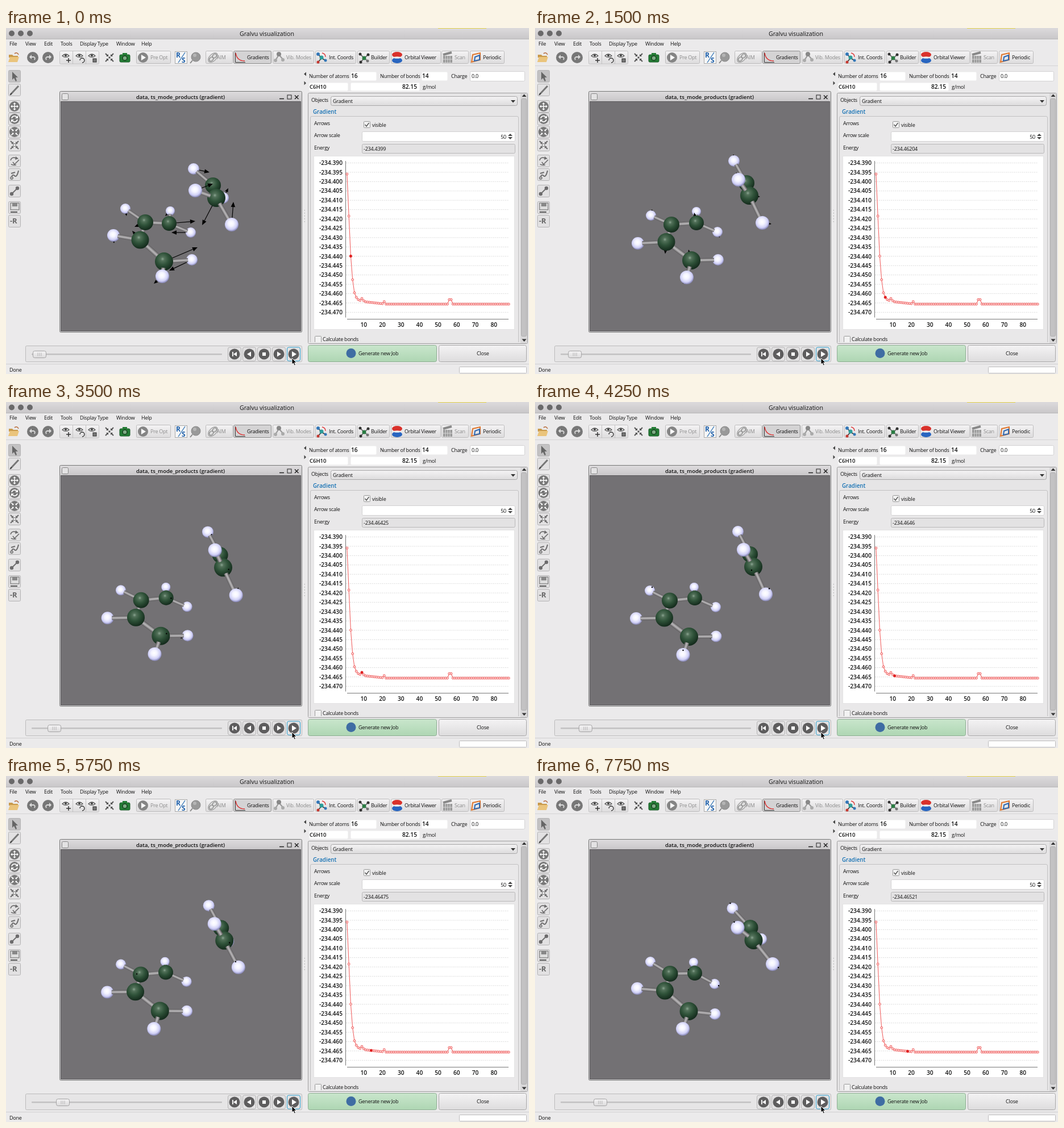
Write an HTML page that moves like this. It is 920x609 px and loops after 8 s.

```html
<!DOCTYPE html>
<html lang="en">
<head>
<meta charset="utf-8">
<title>Gralvu visualization</title>
<style>
html, body { margin: 0; width: 100%; height: 100%; overflow: hidden; background: #ebeaeb; }
svg { display: block; }
text { font: 9px "Open Sans", "Noto Sans", sans-serif; letter-spacing: -.25px; fill: #111; white-space: pre; }
.b { font-weight: 600; font-size: 10.2px; letter-spacing: 0; }
.off { fill: #8b8b8b; }
</style>
</head>
<body>
<svg id="stage" width="920" height="609" viewBox="0 0 920 609">
<defs>
  <linearGradient id="bar" x2="0" y2="1"><stop stop-color="#dcdadc"/><stop offset="1" stop-color="#c9c7c9"/></linearGradient>
  <linearGradient id="btn" x2="0" y2="1"><stop stop-color="#f4f3f4"/><stop offset="1" stop-color="#dddcdd"/></linearGradient>
  <linearGradient id="go" x2="0" y2="1"><stop stop-color="#c9e6cc"/><stop offset="1" stop-color="#aed6b3"/></linearGradient>
  <radialGradient id="H" cx=".46" cy=".42" r=".58"><stop stop-color="#fff"/><stop offset=".35" stop-color="#f4f4ff"/><stop offset=".75" stop-color="#cfcff6"/><stop offset="1" stop-color="#8484b4"/></radialGradient>
  <radialGradient id="C" cx=".42" cy=".36" r=".66"><stop stop-color="#8aa591"/><stop offset=".16" stop-color="#527059"/><stop offset=".5" stop-color="#2f5239"/><stop offset="1" stop-color="#12281a"/></radialGradient>
</defs>
<g id="ui"></g><g id="live"></g><g id="top"></g>
</svg>
<script>
const byId = id => document.getElementById(id);
const rect = (x, y, w, h, fill, stroke = 'none', r = 0) =>
  `<rect x="${x}" y="${y}" width="${w}" height="${h}" rx="${r}" fill="${fill}" stroke="${stroke}"/>`;
const disc = (x, y, r, fill, stroke = 'none', w = 1) =>
  `<circle cx="${x}" cy="${y}" r="${r}" fill="${fill}" stroke="${stroke}" stroke-width="${w}"/>`;
const path = (d, stroke, w = 1, fill = 'none', more = '') =>
  `<path d="${d}" stroke="${stroke}" stroke-width="${w}" fill="${fill}" ${more}/>`;
const solid = (d, fill) => path(d, 'none', 0, fill);
const text = (x, y, s, more = '') => `<text x="${x}" y="${y}" ${more}>${s}</text>`;
const at = (x, y, s) => `<g transform="translate(${x} ${y})">${s}</g>`;

// ---------- icons, centred on 0,0 ----------
const GREY = '#6d6c6d';
const eye = path('M-6 -2Q0 -8 6 -2Q0 3 -6 -2Z', '#555', 1.2, '#eee') + disc(0, -2.5, 2, '#444');
const inward = c => path('M-7 -7L-3 -3M7 -7L3 -3M-7 7L-3 3M7 7L3 3', c, 2) +
  solid('M-2 -2h-4l4 -4zM2 -2h4l-4 -4zM-2 2h-4l4 4zM2 2h4l-4 4z', c);
const cross = path('M0 -5V5M-5 0H5', '#fff', 1.4) +
  solid('M0 -7l2.5 3h-5zM0 7l2.5 -3h-5zM-7 0l3 -2.5v5zM7 0l-3 -2.5v5z', '#fff');
const turn = path('M-5 -1A5 5 0 0 1 4 -3M5 1A5 5 0 0 1 -4 3', '#fff', 1.6) +
  solid('M6 -6v5h-5zM-6 6v-5h5z', '#fff');
const back = path('M-4 -1H2Q5 0 3 4', '#ddd', 1.8) + solid('M-6 -1l4 -4v8z', '#ddd');
const play = solid('M-3 -5L5 0L-3 5Z', '#fff');

function toolbar() {
  let s = at(14, 52, solid('M-9 -5h6l2 2h8v3h-16z', '#c99a4b') + solid('M-10 8l3 -9h16l-3 9z', '#eac47c') +
    path('M1 -7Q6 -10 8 -5', '#b86c3c', 1.5));
  s += at(47, 52, disc(0, 0, 10, '#777') + back);
  s += at(74, 52, disc(0, 0, 10, '#777') + `<g transform="scale(-1 1)">${back}</g>`);
  s += rect(94.5, 40.5, 69, 23, 'url(#btn)', '#c4c3c4', 2) + path('M117.500 41V63M140.500 41V63', '#c4c3c4');
  [105, 129, 151].forEach((x, k) => s += at(x, 51, eye + at(5, 6,
    [path('M0 -4V4M-4 0H4', '#333', 1.5), path('M-4 0A4 4 0 1 1 0 4', '#333', 1.4), rect(-3, -3, 6, 6, '#777', '#333')][k])));
  s += at(182, 52, inward('#555') + rect(-1.5, -1.5, 3, 3, '#555'));
  s += at(209, 53, rect(-9, -6, 18, 13, '#247c35', '#1b5a28', 2) + rect(-4, -9, 8, 4, '#247c35') + disc(0, 0, 4, '#7dab84', '#153e1d', 1.5));
  const tab = (x, w, label, tx, off, on) => rect(x + .5, 40.5, w, 22, on ? '#d4d3d4' : 'url(#btn)', on ? '#8e8e8e' : '#bdbcbd', 2) +
    text(tx, 55, label, off ? 'class="off"' : '');
  s += tab(229, 60, 'Pre Opt', 254, 1) + at(241, 52, disc(0, 0, 9, '#858585') + play);
  s += rect(297.5, 41.5, 21, 21, '#f6f6f6', '#aaa') + text(299, 52, 'R', 'style="fill:#1d5faa;font-weight:700;font-size:12px"') +
    text(309, 61, 'S', 'style="fill:#1d5faa;font-weight:700;font-size:12px"') + path('M303 61L315 43', '#2c70b5', 1.3);
  s += disc(334, 51, 8, '#999', '#888') + disc(332, 48, 3, '#b5b5b5') + path('M328 57L324 62', '#888', 2);
  s += tab(351, 47, 'AIM', 371, 1) + at(364, 52, `<g transform="rotate(-45)"><ellipse rx="10" ry="6" fill="#ddd" stroke="#888"/><ellipse cx="-4" rx="4" ry="3" fill="none" stroke="#777"/><ellipse cx="4" rx="4" ry="3" fill="none" stroke="#777"/></g>`);
  s += tab(400, 66, 'Gradients', 424, 0, 1) + path('M403.500 43V60.500H421', '#333') + path('M404 44Q406 58 420 58', '#d22', 1.4);
  s += tab(469, 72, 'Vib. Modes', 493, 1) + path('M474 57L480 47L487 55', '#999', 2) + disc(474, 57, 3, '#aaa') + disc(480, 46, 4, '#888') + disc(487, 56, 3, '#aaa');
  s += tab(544, 71, 'Int. Coords', 568) + path('M549 46L555 53L549 60M555 53L562 57', '#333', 1.5) +
    disc(549, 46, 3, '#3478b8') + disc(555, 52, 3.5, '#2b9d9a') + disc(549, 60, 2.5, '#c63a32') + disc(562, 57, 2.5, '#3478b8') + path('M556 44Q562 45 562 51', '#d33', 1.3);
  s += tab(618, 56, 'Builder', 642) + path('M623 46L630 53L637 47M630 53L624 60M630 53L636 58', '#444', 1.3) +
    disc(623, 46, 2.5, '#333') + disc(630, 53, 3.5, '#297b42') + disc(637, 47, 2.5, '#333') + disc(624, 60, 2.5, '#333') + disc(636, 58, 2.5, '#777');
  s += tab(677, 87, 'Orbital Viewer', 701) + `<ellipse cx="688" cy="47" rx="9" ry="5" fill="#d9312b"/><ellipse cx="688" cy="57" rx="9" ry="5" fill="#2865c0"/><ellipse cx="688" cy="52" rx="7" ry="1.800" fill="#eee"/>`;
  s += tab(766, 47, 'Scan', 789, 1) + rect(769, 49, 16, 12, '#999') + path('M769 47L784 43', '#888', 4) + path('M773 49v12M777 49v12M781 49v12M769 55h16', '#d8d8d8');
  s += tab(816, 60, 'Periodic', 839) + path('M821 47L834 44V56L819 60Z', '#e0762c', 2) + path('M825 51L833 48V56L824 58Z', '#2e69b3', 2);
  return s;
}

function sideTools() {
  const box = (y, s, on) => rect(4.500, y - 10.5, 21, 21, on ? '#c3c2c3' : '#e2e1e2', '#b3b2b3', 2) + at(15, y, s);
  const knob = s => disc(0, 0, 9, '#777') + s;
  return box(85, solid('M-4 -8V6L-1 3L2 9L4 8L2 2H6Z', '#666'), 1) +
    box(109, path('M-7 8L7 -7', '#777', 3) + path('M-8 9L-5 6', '#333', 1.5)) +
    box(138, knob(cross)) + box(160, knob(turn)) + box(183, knob(`<g transform="scale(.8)">${inward('#fff')}</g>`)) +
    box(206, inward(GREY) + disc(0, 0, 2.5, '#eee', GREY)) +
    box(234, path('M-7 -1Q-5 -8 3 -5M-3 2L0 6L8 -2M-6 6Q-2 8 3 7', GREY, 1.6) + solid('M2 -8l5 4l-6 2z', GREY)) +
    box(258, path('M-6 7Q-4 -2 0 2T7 -7M-6 -2L1 -4', GREY, 2) + disc(-5, 6, 2.5, '#aaa', GREY)) +
    box(287, path('M-5 5L5 -5', GREY, 1.8) + disc(-5, 5, 3.2, GREY) + disc(5, -5, 3.2, GREY)) +
    box(316, rect(-7, -8, 15, 12, '#ddd', '#666') + rect(-4, -8, 9, 6, '#888') + path('M-7 8H5', '#555', 2)) +
    box(340, text(-8, 4, '-R', 'style="font-size:13px;font-weight:700;fill:#666"'));
}

// ---------- chart ----------
const head = [257, 331, 401.5, 443, 466, 474, 478, 479.5, 476, 480];
const px = i => 596.6 + 3.27 * i;
const py = i => i <= 10 ? head[i - 1] : i < 21 ? 482 + (i - 11) * .36 : i == 21 ? 481.500 : i == 56 || i == 57 ? 478 : 486;

function chart() {
  let s = rect(541.5, 225.5, 353, 305, '#fff', '#e3e3e3');
  for (let k = 0; k <= 16; k++) {
    const y = 237.5 + k * 16.43;
    s += path(`M598 ${y}H884`, '#dcdcdc', 1, 'none', 'stroke-dasharray="2 1.500"');
    s += text(592, y + 3.700, '-234.' + (390 + 5 * k), 'class="b" text-anchor="end"');
  }
  s += path('M597.500 234V509.500M600 512.500H884', '#777');
  for (let k = 10; k <= 80; k += 10) s += text(px(k), 526, k, 'class="b" text-anchor="middle"');
  let d = '', dots = '';
  for (let i = 1; i <= 88; i++) {
    d += (i > 1 ? 'L' : 'M') + px(i) + ' ' + py(i);
    dots += disc(px(i), py(i), 1.900, '#fde3e3', '#ee4a4a', .9);
  }
  return s + path(d, '#f06464', 1.1) + dots;
}

function panel() {
  const f = (x, y, w, h, fill = '#fff', edge = '#d2d1d2') => rect(x + .5, y + .5, w, h, fill, edge, 2);
  const check = (x, y) => rect(x + .5, y + .5, 11, 11, '#f2f2f2', '#999', 1);
  let s = solid('M524 81l4 -3.500v7z', '#444') + solid('M528 97l-3.500 -3.500v7z', '#444');
  s += text(533, 88, 'Number of atoms') + f(606, 77, 45, 15, '#fff', '#f4f4f4') + text(607, 88, '16', 'class="b"');
  s += text(658, 88, 'Number of bonds') + f(731, 77, 45, 15, '#fff', '#f4f4f4') + text(732, 88, '14', 'class="b"');
  s += text(783, 88, 'Charge') + f(816, 76, 96, 17) + text(819, 88, '0.0');
  s += f(533, 96, 68, 14, '#fff', '#f4f4f4') + text(534, 107, 'C6H10', 'class="b" style="font-size:9.500px"');
  s += f(606, 96, 121, 14, '#fff', '#f4f4f4') + text(723, 107, '82.15', 'class="b" text-anchor="end"') + text(733, 107, 'g/mol');
  s += rect(531.5, 114.5, 386, 441, '#e6e5e6', '#9d9c9d', 2);
  s += text(537, 130, 'Objects') + rect(571.5, 120.5, 328, 16, 'url(#btn)', '#a9a8a9', 3) + text(575, 132, 'Gradient') + solid('M888 127h8l-4 4.500z', '#333');
  s += text(540, 151, 'Gradient', 'class="b" style="fill:#1672b4;font-size:9.800px"');
  s += path('M535.500 553V158Q535.500 155.500 538 155.500H899Q901.500 155.500 901.500 158V553', '#c2c1c2', 1, '#e9e8e9');
  s += text(542, 171, 'Arrows') + check(629, 164) + path('M631.500 170L634 173L638.500 167', '#555', 1.4) + text(644, 174, 'visible');
  s += text(542, 192, 'Arrow scale') + f(626, 182, 269, 17) + text(880, 195, '50', 'text-anchor="end"') + solid('M883 190l4 -4l4 4zM883 192l4 4l4 -4z', '#444');
  s += text(542, 214, 'Energy') + f(626, 204, 269, 16, '#e3e2e3', '#b9b8b9');
  s += chart() + rect(543.5, 542.5, 11, 11, '#f2f2f2', '#999', 1) + text(557, 551, 'Calculate bonds');
  s += rect(532, 553, 372, 2, '#e6e5e6') + rect(905, 115, 12, 440, '#d9d8d9') + rect(906.5, 124.500, 9, 418, '#c3c2c3', '#adacad', 2);
  s += solid('M907.500 121h8l-4 -4.500zM907.500 547.500h8l-4 4.500z', '#333');
  for (let y = 320; y < 345; y += 5) s += rect(524.5, y, 1.500, 1.500, '#bbb');
  s += rect(531.5, 558.5, 226, 29, 'url(#go)', '#8fae94', 3) + disc(607, 572.5, 8.500, '#3f6da3') + text(620, 576, 'Generate new Job');
  return s + rect(761.5, 558.5, 154, 29, 'url(#btn)', '#a9a8a9', 3) + text(828, 576, 'Close');
}

function frame() {
  let s = rect(0, 0, 920, 609, '#ebeaeb') + rect(0, 0, 920, 19, 'url(#bar)') + path('M0 19.500H920', '#b9b8b9') + rect(760, 0, 85, 1, '#e8d648');
  [10, 26, 42].forEach(x => s += disc(x, 9.5, 5, '#6a696a'));
  s += text(459, 13.5, 'Gralvu visualization', 'text-anchor="middle" style="font-size:10.600px;letter-spacing:0"');
  const menu = { File: 6, View: 34, Edit: 67, Tools: 96, 'Display Type': 130, Window: 194, Help: 238 };
  for (const m in menu) s += text(menu[m], 30.5, m);
  s += toolbar() + path('M0 66.500H920', '#d5d4d5') + sideTools();
  s += rect(94.5, 111.5, 426, 424, '#dad9da', '#777', 2) + rect(96, 113, 423, 16, 'url(#bar)') + rect(96.5, 129.5, 422, 404, '#737174', '#59575a');
  s += rect(98.5, 115.5, 11, 11, '#e3e2e3', '#888', 2) + text(307, 125, 'data, ts_mode_products (gradient)', 'class="b" text-anchor="middle" style="font-size:9.500px"');
  s += path('M481 124.500H489M508 118.500L514.500 125M514.500 118.500L508 125', '#222', 1.5) + rect(495, 118, 7, 7, 'none', '#222');
  s += rect(34.5, 559.5, 486, 28, '#e6e5e6', '#bbbabb', 2) + rect(45, 573, 335, 2.500, '#c2c1c2', 'none', 1);
  const marks = ['M4 -4V4L-2 0ZM-4 -4h1.800v8h-1.800z', 'M3 -4.500V4.500L-4 0Z', 'M-3 -3H3V3H-3Z', 'M-3 -4.500V4.500L4 0Z', 'M-3 -5V5L5 0Z'];
  marks.forEach((d, k) => s += at(402 + 26 * k, 574, rect(-11.5, -12, 23, 24, '#e3e2e3', k > 3 ? '#2b9fce' : '#b5b4b5', 3) +
    disc(0, 0, 9.5, '#5e5d5e') + solid(d, '#fff')));
  s += panel() + path('M0 591.500H920', '#cfcecf') + text(6, 605, 'Done');
  return s + rect(797.5, 596.5, 118, 11, '#fff', '#bdbcbd', 1);
}

// ---------- molecule ----------
// each atom: radius, late bend, then x,y at the key steps
const keys = [3, 6, 8, 11, 18];
const diene = {
  Ha: [9, 2.7, 210, 318, 204, 330, 202, 331, 202, 332, 203, 327],
  Hb: [8, 1.2, 289, 322, 284, 323, 282, 326, 280, 326, 279, 328],
  Hc: [9, 2, 325, 360, 321, 359, 319, 360, 318, 361, 316, 366],
  Hd: [11, 3, 189, 365, 181, 379, 179, 380, 178, 381, 180, 374],
  He: [10, 1.9, 327, 408, 322, 408, 320, 410.5, 318.5, 412.5, 316.5, 419],
  Hf: [12, 1, 275, 437, 267, 439, 262, 443, 260.5, 445, 260, 445],
  C1: [14, 3, 245, 342, 240, 346, 238, 348.5, 237, 349.5, 237.5, 348],
  C2: [13, 1.5, 287, 344, 284, 343, 282, 344.5, 281, 345, 281, 347],
  C3: [15.5, 3, 236, 373, 231, 376.5, 229, 379, 227.5, 380, 228.5, 378],
  C4: [16, 1, 278, 411, 275, 409, 273, 411, 271, 413, 270.5, 414]
};
const ethene = {
  Ca: [14, 1, 364, 277, 372, 273, 376, 270, 378, 268, 378.5, 267],
  Cb: [16, 1, 370, 299, 377, 295, 381, 292, 384, 290, 384.5, 289],
  H1: [10, 4, 330, 248, 350, 234, 354, 229, 357, 228, 347.5, 233],
  H2: [12, 4, 333, 286, 358, 267, 368, 261, 367, 260, 356.5, 267],
  H3: [12, 1.7, 397, 346, 400, 343, 404, 341, 406, 338.5, 418, 331],
  H4: [10, 1.7, 382, 299, 380, 296, 384, 295, 389, 293, 398, 287]
};
const atoms = { ...diene, ...ethene };
const order = 'Hb Hb-C2 C1-C2 Ha Ha-C1 Hc C2-Hc C2 C1-C3 C1 Hd Hd-C3 C3-C4 C3 He C4-He C4 C4-Hf Hf ' +
  'H1 H1-Ca H4 H4-Ca Ca Ca-Cb Cb Cb-H3 H3 Cb-H2 H2';
const forces = {
  3: { H1: [28, 6], H2: [31, -12], H4: [9, -17], Cb: [-25, 48], H3: [3, -40], C2: [46, -4], Hc: [-34, 0], C4: [59, -25],
    He: [-40, 19], Hf: [-15, 13], Hb: [-9, 9], Ha: [2, 13], Hd: [1, 14], C1: [-19, 8], C3: [-14, -16] },
  6: { H1: [-1, -12], H2: [-4, -13], Cb: [19, 2], H3: [16, 2], Ha: [2, -11], C2: [-4, -18], Hc: [4, 10], Hd: [0, -11],
    C3: [-2, 21], C4: [-5, -19], Hf: [-7, 11] },
  8: { Cb: [16, 2], H3: [3, -16], H1: [10, 7], Ca: [-15, 2], C2: [13, 1], He: [-14, 5], C4: [15, -6], Hb: [0, 10] },
  11: { H3: [6, -10], Cb: [-3, 6], Ha: [4, -6], He: [-11, 4], Hf: [0, -8] },
  14: { Cb: [9, 4], C1: [-7, -1], C4: [16, -5], H3: [-5, -10] },
  16: { H3: [10, -7], Ca: [-14, 8] },
  18: { H1: [-4, -9], H2: [-6, -10], H3: [10, 6], Hc: [7, 3], C2: [-11, -6] }
};
const forceKeys = Object.keys(forces).map(Number);
const mix = (a, b, u) => a + (b - a) * u;

function segment(list, i) {
  let k = 0;
  while (k < list.length - 2 && i >= list[k + 1]) k++;
  return [k, (i - list[k]) / (list[k + 1] - list[k])];
}

function place(name, i) {
  const [r, bend, ...p] = atoms[name];
  let [k, u] = segment(keys, i);
  if (k == 0) u = 1 - (1 - u) ** 1.6;
  if (k == 3) u = u ** bend;
  return { r, x: mix(p[2 * k], p[2 * k + 2], u), y: mix(p[2 * k + 1], p[2 * k + 3], u) };
}

function force(name, i) {
  const [k, u] = segment(forceKeys, i);
  const a = forces[forceKeys[k]][name] || [0, 0], b = forces[forceKeys[k + 1]][name] || [0, 0];
  return [mix(a[0], b[0], u), mix(a[1], b[1], u)];
}

function bond(a, b) {
  const dx = b.x - a.x, dy = b.y - a.y, len = Math.hypot(dx, dy), w = (a.r + b.r) / 4;
  const s = a.r * .7 / len, e = 1 - b.r * .7 / len;
  if (s >= e) return '';
  const d = `M${a.x + dx * s} ${a.y + dy * s}L${a.x + dx * e} ${a.y + dy * e}`;
  return path(d, '#656365', w + .6) + path(d, '#8f8d8f', w * .75) + path(d, '#b2b0b2', w * .35);
}

function atom(name, i) {
  const a = place(name, i), [dx, dy] = force(name, i), len = Math.hypot(dx, dy);
  const ball = disc(a.x, a.y, a.r, `url(#${name[0]})`);
  if (len < 3) return ball;
  if (len < a.r) return ball + disc(a.x + dx, a.y + dy, 1.2, '#000');
  const h = 2 + Math.min(7, len * .25), w = h * .42;
  const arrow = path(`M0 0H${len - h}`, '#000', 1.2) + solid(`M${len} 0l${-h} ${w}v${-2 * w}z`, '#000');
  const deg = Math.atan2(dy, dx) * 180 / Math.PI;
  return `<g transform="translate(${a.x} ${a.y}) rotate(${deg})">${arrow}</g>` + ball;
}

const molecule = i => order.split(' ').map(s => {
  const [a, b] = s.split('-');
  return b ? bond(place(a, i), place(b, i)) : atom(a, i);
}).join('');

// ---------- playback ----------
const energy = ['4399', '45246', '45971', '46204', '46331', '46388', '46298', '46425', '4646', '46466', '46471', '46475', '46485', '46494', '46507', '46521'];
const LOOP = 8000, TICK = 250, STEP = 520;
let shown = -1;

function draw(ms) {
  const t = Math.floor(ms % LOOP / TICK) * TICK;
  if (t === shown) return;
  shown = t;
  const pose = 3 + Math.floor((t + 60) / STEP);
  const n = Math.floor((t + 310) / STEP); // readouts run ahead of the 3D view
  const x = 59 + 3.73 * n;
  byId('live').innerHTML = molecule(pose) + disc(px(pose), py(pose), 2.2, '#e02020', '#e02020', .6) +
    text(629, 216, '-234.' + energy[n]) +
    at(x, 574.5, rect(-11.5, -6, 23, 12, 'url(#btn)', '#a3a2a3', 3) + path('M-3 -3V3M0 -3V3M3 -3V3', '#b5b4b5'));
}

byId('ui').innerHTML = frame();
byId('top').innerHTML = at(503, 581, path('M0 0V11L2.500 8.800L4.300 13L6.300 12.100L4.500 8H8Z', '#fff', .9, '#000'));
const start = performance.now();
function loop() {
  draw(performance.now() - start);
  requestAnimationFrame(loop);
}
loop();
</script>
</body>
</html>
```
